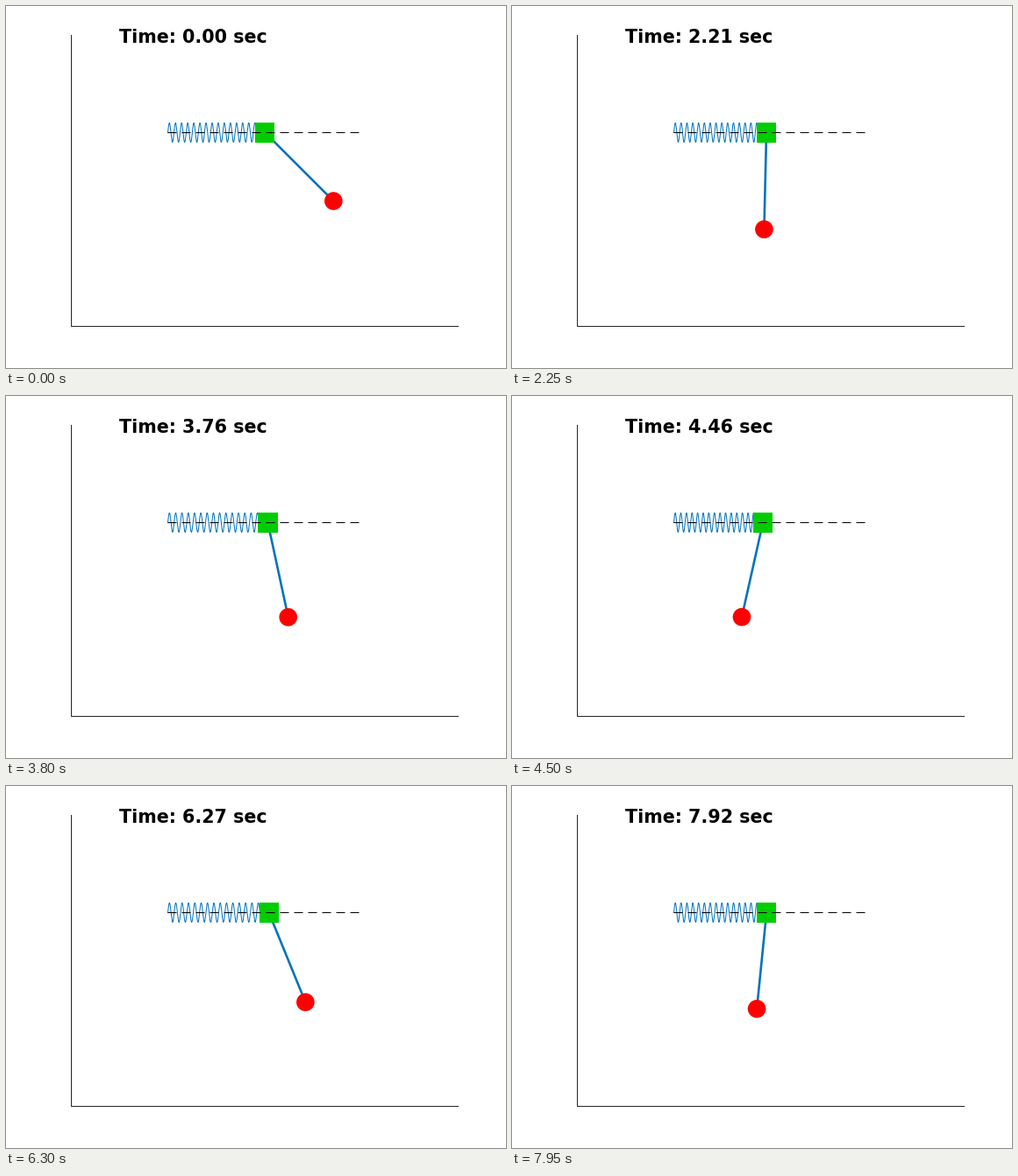
Animation of 570 by 413 pixels, one loop 8 s. Source, as a matplotlib script:

```python
import numpy as np
import matplotlib.pyplot as plt
from matplotlib.animation import FuncAnimation
from matplotlib.patches import Circle, Rectangle

W, H, DPI = 570, 413, 100
PX = 72 / DPI                 # one pixel in points
DT = 20 / 399                 # simulated seconds per step
FRAMES, INTERVAL = 160, 50
CX, CY, ROD = 295.3, 144.4, 110.4
WALL = 184.5
BLOCK, RADIUS = 22.2, 10.3
BLUE = "#0072BD"


def angle(t):
    """Pendulum angle in radians: a damped swing about a small bias."""
    w = 2.04
    return (0.11 + 0.675 * np.exp(-0.142 * t) * np.cos(w * t)
            + 0.03 * np.sin(w * t))


def shift(t):
    """Cart displacement in pixels: a fast and a slow swing with slight drift."""
    return 7.5 * np.sin(2.28 * t) + 3 * np.sin(0.95 * t) - 0.33 * t


fig = plt.figure(figsize=(W / DPI, H / DPI), dpi=DPI, facecolor="white")
ax = fig.add_axes([0, 0, 1, 1])
ax.set(xlim=(0, W), ylim=(H, 0))
ax.axis("off")

ax.plot([74, 74, 515], [33, 365, 365], color="#262626", lw=PX)
title = ax.text(128.9, 42, "", family="DejaVu Sans", weight="bold",
                size=14.9, ha="left", va="baseline")

s = np.linspace(0, 1, 1000)
coil = CY - 11 * np.sin(100 * s)
spring, = ax.plot([], [], color=BLUE, lw=PX, zorder=2)
rod, = ax.plot([], [], color=BLUE, lw=2.6 * PX, zorder=3)
block = ax.add_patch(Rectangle((0, CY - BLOCK / 2), BLOCK, BLOCK,
                               fc="#00CC00", ec="none", zorder=4))
ball = ax.add_patch(Circle((0, 0), RADIUS, fc="red", ec="none", zorder=4))
ax.plot([184, 405], [144, 144], color="black", lw=PX,
        dashes=(10, 6), dash_capstyle="butt", zorder=5)


def draw(frame):
    t = max(frame - 1, 0) * DT
    x, th = CX + shift(t), angle(t)
    bx, by = x + ROD * np.sin(th), CY + ROD * np.cos(th)
    title.set_text(f"Time: {t:.2f} sec")
    spring.set_data(WALL + (x - WALL) * s, coil)
    rod.set_data([x, bx], [CY, by])
    block.set_x(x - BLOCK / 2)
    ball.center = bx, by
    return title, spring, rod, block, ball


anim = FuncAnimation(fig, draw, frames=FRAMES, interval=INTERVAL,
                     repeat=True, repeat_delay=0, blit=False)
plt.show()
```
